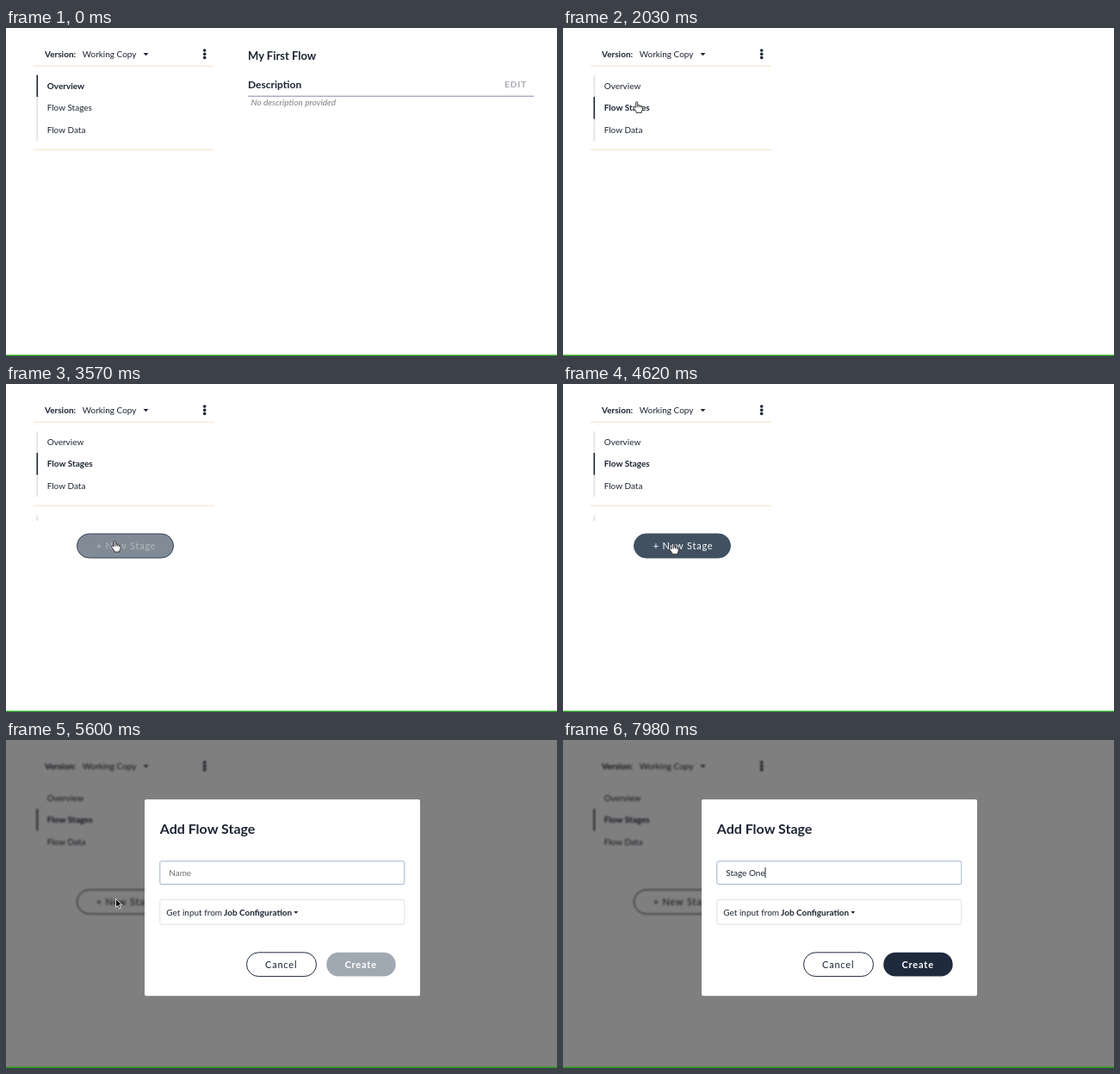
Write an HTML page that moves like this. It is 640 by 381 pixels and loops after 8 s.

```html
<!DOCTYPE html>
<html lang="en">
<head>
<meta charset="utf-8">
<title>Add a flow stage</title>
<style>
  html, body { margin: 0; width: 100%; height: 100%; overflow: hidden; background: #fff; }
  svg { display: block; width: 640px; height: 381px; }
  text { font: 10px Lato, sans-serif; fill: #1c2433; white-space: pre; }
  .b { font-weight: 700; }
  .btn { font-size: 11px; letter-spacing: .8px; }
  .pale { stroke: #dedede; stroke-width: 1.5; }
  .rule { stroke: #f8dfc0; }
  .box { fill: #fff; stroke: #dfe0e2; }
  .pill { fill: #fff; stroke: #1f2a3c; }
  .blurred { filter: blur(.9px); }
  .blurred .pale, .blurred .rule { display: none; }
</style>
</head>
<body>
<svg viewBox="0 0 640 381">
  <g id="page">
    <text class="b" x="45" y="34">Version:</text>
    <text x="88.7" y="34">Working Copy</text>
    <path d="M159.5 29h6l-3 3.2z" fill="#1c2433"/>
    <g fill="#1c2433">
      <circle cx="230.7" cy="26" r="1.8"/>
      <circle cx="230.7" cy="30.2" r="1.8"/>
      <circle cx="230.7" cy="34.4" r="1.8"/>
    </g>
    <path class="rule" d="M32 44.2H241.5M32 141.3H241.5"/>
    <path class="pale" d="M36.3 55V131"/>
    <path id="mark" d="M36.3 54.5V80" stroke="#1c2433" stroke-width="1.6"/>
    <text class="tab" x="47.7" y="70.8">Overview</text>
    <text class="tab" x="47.7" y="96.3">Flow Stages</text>
    <text class="tab" x="47.7" y="121.8">Flow Data</text>
    <g id="overview">
      <text class="b" x="281" y="36.8" style="font-size:13px">My First Flow</text>
      <text class="b" x="281" y="70.2" style="font-size:12px">Description</text>
      <text class="b" x="579" y="69" style="fill:#a4a8af;letter-spacing:1px">EDIT</text>
      <path d="M281 79.2H613" stroke="#8587a8"/>
      <text x="284.5" y="90" style="font-style:italic;fill:#7d7f88">No description provided</text>
    </g>
    <g id="stages">
      <path class="pale" d="M36.3 152.5V159"/>
      <rect id="newBtn" class="pill" x="82.5" y="174" width="112" height="28" rx="14"/>
      <text id="newText" class="btn" x="104.7" y="192">+ New Stage</text>
    </g>
  </g>
  <rect id="shade" width="640" height="381" opacity=".5"/>
  <g id="dialog">
    <rect x="161" y="69" width="320" height="228.3" rx="2" fill="#fff"/>
    <text class="b" x="178.7" y="108.5" style="font-size:16px">Add Flow Stage</text>
    <rect id="field" class="box" x="178.8" y="140.8" width="284" height="26.8" rx="2"/>
    <text id="name" x="189.2" y="157.8"></text>
    <path id="caret" d="M0 148V160" stroke="#1c2433"/>
    <rect class="box" x="178.8" y="185.4" width="284" height="28.8" rx="2"/>
    <text x="186.3" y="203.8">Get input from</text>
    <text class="b" x="253" y="203.8">Job Configuration</text>
    <path d="M334.3 199h5l-2.5 2.8z" fill="#1c2433"/>
    <rect class="pill" x="279.5" y="246.8" width="81" height="27.8" rx="13.9"/>
    <text class="btn" x="301" y="264.7">Cancel</text>
    <rect id="create" x="372.2" y="246.8" width="80.5" height="27.8" rx="13.9"/>
    <text class="btn b" x="393.5" y="264.7" style="fill:#fff">Create</text>
  </g>
  <g id="pointer" stroke-linejoin="round">
    <path id="arrow" d="M0 0V10L2.3 7.9 4 11.6 5.7 10.9 4.1 7.3H7.2Z" fill="#111" stroke="#fff" stroke-width=".8"/>
    <path id="hand" d="M-1 6.8V1.7Q-1 .7 0 .7T1 1.7V4.6Q2 3.8 3 5Q4 4.3 4.9 5.6Q6.6 5.2 6.6 7V9.2Q6.6 11 5.5 12V13.4H-.6V12.2L-3.5 8.2Q-4.4 6.9-3.4 6.4T-1 7.6M1 4.6V7M3 5V7M4.9 5.6V7.4" fill="#fff" stroke="#222" stroke-width=".9"/>
  </g>
  <rect y="379.6" width="640" height="1.4" fill="#23a01a"/>
</svg>
<script>
  const LOOP = 8000, TICK = 70;
  const OPEN = 4690, TYPE = 6440;
  const keyTimes = [0, 210, 350, 490, 630, 770, 910, 1050, 1190];
  // time, x, y of the pointer
  const path = [[1400, 113.5, 15.8], [1680, 85.7, 85], [2940, 85.7, 85], [3640, 127.5, 184.4]];

  const $ = id => document.getElementById(id);
  const tabs = document.querySelectorAll('.tab');
  const show = (id, on) => { $(id).style.display = on ? '' : 'none'; };
  const ramp = (t, a, b) => Math.min(1, Math.max(0, (t - a) / (b - a)));
  const ease = p => p * p * (3 - 2 * p);
  const mix = (a, b, p) => `rgb(${a.map((v, i) => v + (b[i] - v) * p)})`;

  function pointerAt(t) {
    let [, x, y] = path[0];
    for (let i = 1; i < path.length; i++) {
      const p = ease(ramp(t, path[i - 1][0], path[i][0]));
      x += (path[i][1] - path[i - 1][1]) * p;
      y += (path[i][2] - path[i - 1][2]) * p;
    }
    return [x, y];
  }

  function drawPage(t) {
    const tab = t < 1960 ? 0 : 1;
    tabs.forEach((el, i) => el.classList.toggle('b', i === tab));
    $('mark').setAttribute('transform', `translate(0 ${tab * 25.5})`);
    show('overview', t < 2030);
    show('stages', t >= 2240);
    const hover = ramp(t, 3430, 3640) * (1 - ramp(t, OPEN, 4970));
    $('newBtn').style.fill = mix([255, 255, 255], [66, 81, 97], hover);
    $('newBtn').style.stroke = mix([31, 42, 60], [66, 81, 97], hover);
    $('newText').style.fill = mix([28, 36, 51], [255, 255, 255], hover);
    $('page').classList.toggle('blurred', t >= OPEN);
  }

  function drawDialog(t) {
    show('shade', t >= OPEN);
    show('dialog', t >= OPEN);
    if (t < OPEN) return;
    const typed = 'Stage One'.slice(0, keyTimes.filter(k => t >= TYPE + k).length);
    const name = $('name');
    name.textContent = typed || 'Name';
    name.style.fill = typed ? '#1c2433' : '#6b6f76';
    const end = typed ? name.getComputedTextLength() + .3 : .6;
    $('caret').setAttribute('transform', `translate(${189.2 + end} 0)`);
    show('caret', typed || (t - OPEN) % 1000 < 500);
    $('field').style.stroke = mix([223, 224, 226], [158, 178, 207], ramp(t, OPEN, 4900));
    $('create').style.fill = mix([160, 168, 178], [31, 42, 60], ramp(t, TYPE - 20, 6650));
  }

  function drawPointer(t) {
    show('pointer', t >= 1400 && t < TYPE);
    const [x, y] = pointerAt(t);
    const over = t < OPEN && (y > 80 && y < 105 || y > 174);
    show('hand', over);
    show('arrow', !over);
    $('pointer').setAttribute('transform', `translate(${x} ${y})`);
  }

  function frame(now) {
    const t = Math.floor(now % LOOP / TICK) * TICK;
    drawPage(t);
    drawDialog(t);
    drawPointer(t);
    requestAnimationFrame(frame);
  }
  frame(0);
</script>
</body>
</html>
```
